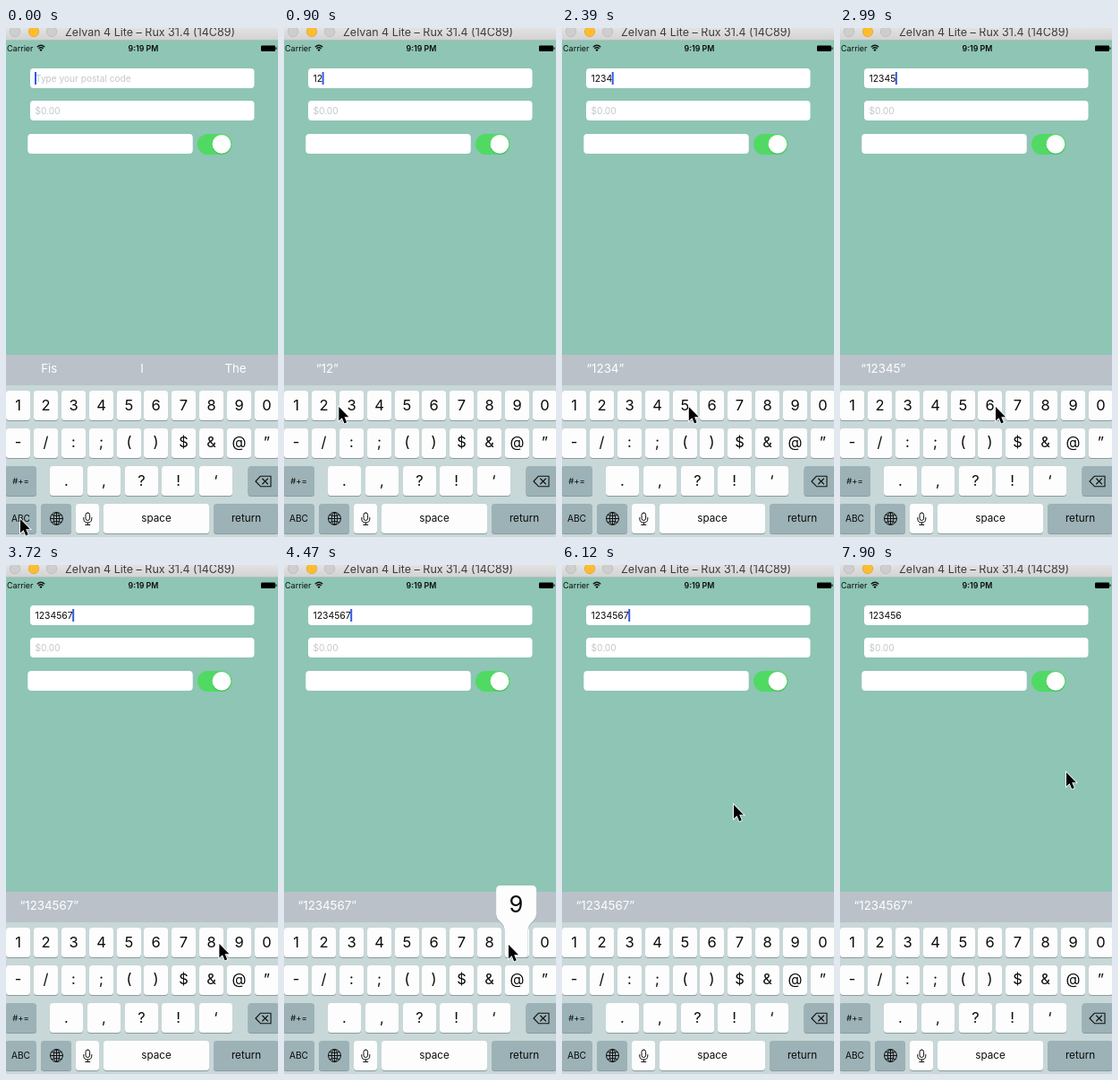
These frames come from a looping animation (304 px wide and 567 px high, 8000 ms). An HTML page:

```html
<!DOCTYPE html>
<html lang="en">
<head>
<meta charset="utf-8">
<title>Postal code form</title>
<style>
  html, body { margin: 0; width: 100%; height: 100%; overflow: hidden; background: #8ec5b4; }
  svg { display: block; width: 304px; height: 567px; }
  text { font-family: Inter, Roboto, "Liberation Sans", sans-serif; fill: #0b0b0b; }
  .mid { text-anchor: middle; }
  .field { font-size: 10.4px; }
  .hint { font-size: 10.15px; fill: #c4c6ca; }
  .word { font-size: 13.3px; fill: #fff; text-anchor: middle; }
  .line { fill: none; stroke: #111; stroke-linecap: round; stroke-linejoin: round; }
</style>
</head>
<body>
<svg viewBox="0 0 304 567">
  <defs>
    <linearGradient id="bar" x2="0" y2="1">
      <stop stop-color="#e2e2e2"/><stop offset="1" stop-color="#d2d2d2"/>
    </linearGradient>
  </defs>
  <rect width="304" height="567" fill="#8ec5b4"/>

  <!-- window title -->
  <rect width="304" height="14" fill="url(#bar)"/>
  <rect y="13" width="304" height="1" fill="#b4bfba"/>
  <g stroke-width=".7">
    <circle cx="10" cy="4" r="5.7" fill="#cecece" stroke="#b6b6b6"/>
    <circle cx="31" cy="4" r="5.7" fill="#ffbd2e" stroke="#dfa023"/>
    <circle cx="51" cy="4" r="5.7" fill="#cecece" stroke="#b6b6b6"/>
  </g>
  <text x="66" y="9" font-size="12.5" style="fill:#3c3c3c">Zelvan 4 Lite – Rux 31.4 (14C89)</text>

  <!-- status bar -->
  <text x="1" y="25.5" font-size="9">Carrier</text>
  <path class="line" d="M34.8 21.2Q39 17.4 43.2 21.2M36.4 23Q39 20.6 41.6 23" stroke-width="1.3" style="stroke-linecap:butt"/>
  <path d="M37.4 24.2Q39 22.8 40.6 24.2L39 26Z"/>
  <text class="mid" x="153.5" y="25.5" font-size="8.8" font-weight="600">9:19 PM</text>
  <rect x="285" y="19.5" width="16" height="6.5" rx="1.2"/>
  <rect x="301.5" y="21.4" width="1" height="2.6"/>

  <!-- form -->
  <g fill="#fff">
    <rect x="27" y="45" width="250.5" height="22" rx="4"/>
    <rect x="27" y="81" width="250.5" height="22" rx="4"/>
    <rect x="24.3" y="118" width="184.4" height="22" rx="4"/>
  </g>
  <text class="hint" id="hint" x="33" y="59.8">Type your postal code</text>
  <text class="hint" x="32.5" y="95.8">$0.00</text>
  <text class="field" id="typed" x="32.5" y="59.8"></text>
  <rect id="caret" y="49" width="2" height="14" fill="#2f5be8"/>
  <rect x="214" y="118" width="38.5" height="23" rx="11.5" fill="#50da63"/>
  <circle cx="241" cy="130.6" r="10.5" fill="#2f7c4a" opacity=".3"/>
  <circle cx="241" cy="129.4" r="10.4" fill="#fff"/>

  <!-- keyboard -->
  <rect y="364" width="304" height="34" fill="#bac1c9"/>
  <rect y="398" width="304" height="169" fill="#c8d7d7"/>
  <text class="word" id="guess" x="48.3" y="384"></text>
  <g id="others">
    <text class="word" x="152" y="384">I</text>
    <text class="word" x="256.5" y="384">The</text>
  </g>
  <g id="keys"></g>
  <g class="line" stroke-width="1">
    <path d="M284.5 499.2H296V510.7H284.5L279 505ZM286.6 502L292.6 508M292.6 502L286.6 508" stroke-width="1.1"/>
    <circle cx="56.5" cy="546.5" r="7"/>
    <ellipse cx="56.5" cy="546.5" rx="3.3" ry="7"/>
    <path d="M49.5 546.5H63.5M56.5 539.5V553.5M51 542.5Q56.5 545 62 542.5M51 550.5Q56.5 548 62 550.5"/>
    <rect x="89" y="540" width="4.6" height="8.5" rx="2.3"/>
    <path d="M86.8 545.5V547Q87 551 91.3 551T95.8 547V545.5M91.3 551V553.5M88.8 553.5H93.8"/>
  </g>

  <g id="popup">
    <path id="shade" fill="#8c9b9f" transform="translate(0 1)"/>
    <path id="bubble" fill="#fdfdfd"/>
    <text class="mid" id="big" y="387" font-size="25.5"></text>
  </g>
  <path id="cursor" d="M0 0V15.6L3.6 12.2L6.2 18.4L8.8 17.3L6.2 11.2H11Z" stroke="#fff" stroke-width="1.6" paint-order="stroke"/>
</svg>
<script>
const LOOP = 8000, TICK = 148.7; // the screen refreshes once per tick
const PITCH = 30.85, LIMIT = 7;
const $ = id => document.getElementById(id);

function key(x, y, w, label = "", size = 16.5, { dark = false, lift = 0 } = {}) {
  const rect = (dy, fill) =>
    `<rect x="${x}" y="${y + dy}" width="${w}" height="33" rx="3.5" fill="${fill}"/>`;
  return rect(1.1, "#8c9b9f") + rect(0, dark ? "#9cb2b6" : "#fdfdfd") +
    `<text class="mid" x="${x + w / 2}" y="${y + 16.5 + size * .36 - lift}" font-size="${size}">${label}</text>`;
}

const row = (chars, x, y, pitch, w, lift) => chars.map((c, i) =>
  key(Math.round(x + i * pitch), y, w, c, 16.5, { lift })).join("");

const dark = { dark: true };
$("keys").innerHTML =
  row([..."1234567890"], 0.2, 404, PITCH, 27, 0) +
  row(["-", "/", ":", ";", "(", ")", "$", "&amp;", "@", "”"], 0.2, 446, PITCH, 27, 1.4) +
  row([...".,?!‘"], 49, 488, 41.75, 37, 0) +
  key(-1, 488, 35, "#+=", 9.5, dark) + key(270.5, 488, 35, "", 0, dark) +
  key(-1, 530, 35, "ABC", 10.2, dark) + key(39, 530, 34, "", 0, dark) +
  key(78, 530, 26) + key(109, 530, 118, "space", 11.7, { lift: 1 }) +
  key(232, 530, 73, "return", 11.7, { dark: true, lift: 1 });

// Ticks at which 1, 2, 3 … 9 are pressed; the 8 is tried once more
const downs = [3, 5, 8, 13, 17, 21, 24, 26, 30];
const taps = downs.map((at, i) => ({ at, digit: i + 1, hold: i < LIMIT ? 1 : 3 }));
taps.push({ at: 36, digit: 8, hold: 2 });

// Pointer key points [tick, x, y]: rest on each key for its press, then wander off
const path = [
  [0, 16, 547],
  ...downs.slice(0, 8).flatMap((at, i) => [at - 1, at].map(t => [t, 13 + 32.2 * i, 422])),
  [29, 251, 423], [34, 251, 423], [36, 231, 423], [40, 231, 423],
  [41, 192, 267], [42, 178, 163], [45, 188, 152], [49, 262, 230], [51, 253, 231]
];

function pointerAt(tick) {
  const next = path.findIndex(p => p[0] > tick);
  if (next < 0) return path.at(-1).slice(1);
  const [t0, ...from] = path[next - 1], [t1, ...to] = path[next];
  return from.map((v, i) => v + (to[i] - v) * (tick - t0) / (t1 - t0));
}

function bubblePath(c) {
  const l = Math.max(c - 22.5, 0), r = l + 45, a = c - 13, b = c + 13;
  return `M${l + 5} 357H${r - 5}Q${r} 357 ${r} 362V388Q${r} 393 ${r - 4} 397
    Q${b} 401 ${b} 408V434Q${b} 437 ${b - 3} 437H${a + 3}Q${a} 437 ${a} 434V408
    Q${a} 401 ${l + 4} 397Q${l} 393 ${l} 388V362Q${l} 357 ${l + 5} 357Z`;
}

const show = (id, on) => $(id).style.display = on ? "" : "none";

function draw(time) {
  const tick = Math.floor(time / TICK);
  $("cursor").setAttribute("transform", `translate(${pointerAt(tick)})`);

  const count = Math.min(LIMIT, taps.filter(p => p.at + p.hold <= tick).length);
  const digits = "1234567".slice(0, count);
  const erased = tick >= 53;
  $("typed").textContent = erased ? digits.slice(0, -1) : digits;
  $("guess").textContent = count ? `“${digits}”` : "Fis";
  show("hint", !count);
  show("others", !count);

  // The caret blinks once typing has been idle for a while
  show("caret", tick < 44 || (tick - 44) % 7 >= 3);
  $("caret").setAttribute("x", 32 + (count && $("typed").getComputedTextLength()));

  const tap = taps.find(p => tick >= p.at && tick < p.at + p.hold);
  show("popup", tap);
  if (tap) {
    const c = 12.8 + (tap.digit - 1) * PITCH;
    for (const id of ["bubble", "shade"]) $(id).setAttribute("d", bubblePath(c));
    $("big").setAttribute("x", Math.max(c, 22.5) - .3);
    $("big").textContent = tap.digit;
  }
}

const start = performance.now();
function tick() {
  draw((performance.now() - start) % LOOP);
  requestAnimationFrame(tick);
}
tick();
</script>
</body>
</html>
```
